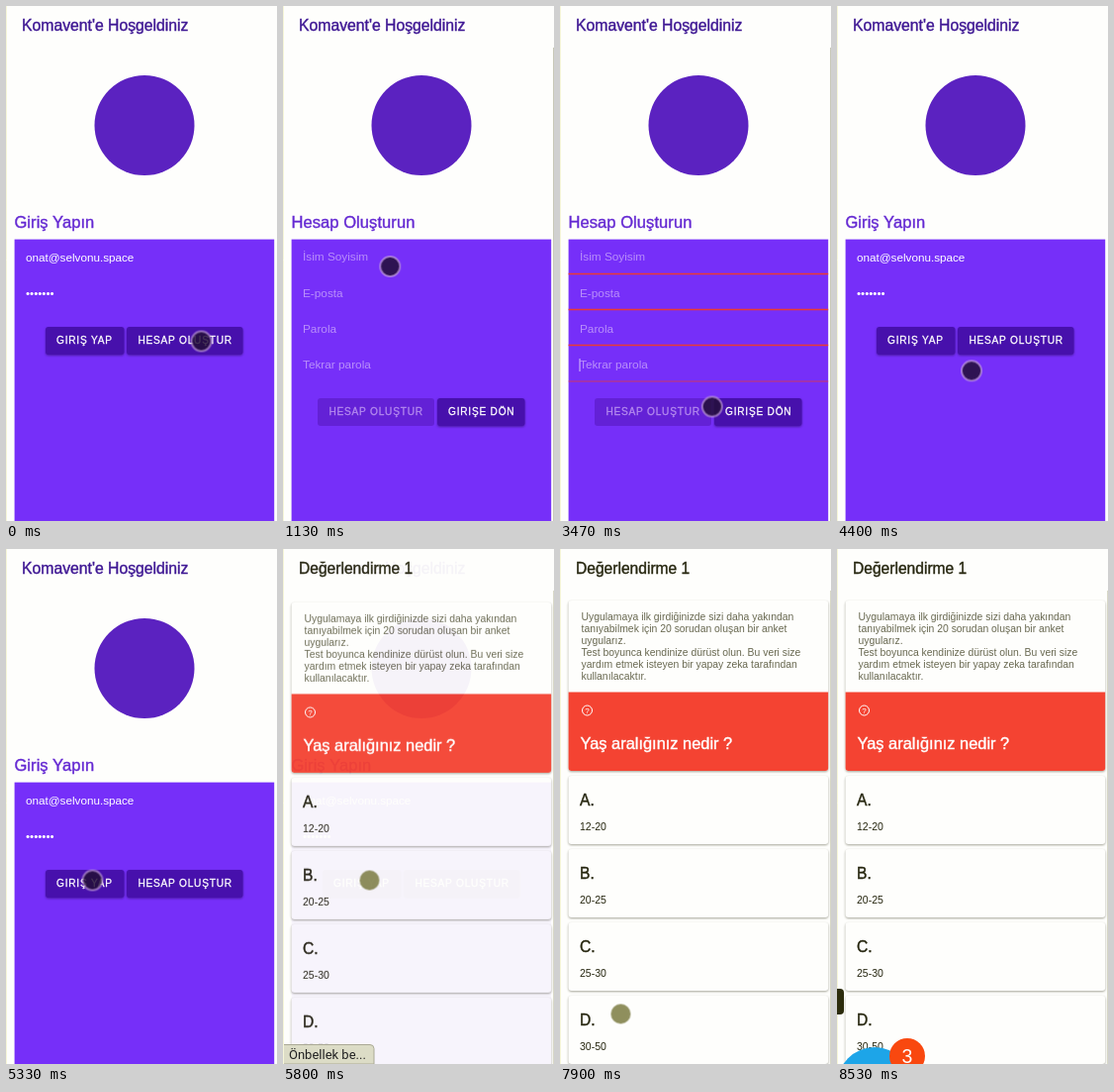
Recreate the animation shown at these times as an HTML page. Size 274 px wide and 520 px high, loop 8560 ms.

```html
<!DOCTYPE html>
<html lang="tr">
<head>
<meta charset="utf-8">
<title>Giriş ve değerlendirme</title>
<style>
html, body { margin: 0; width: 100%; height: 100%; overflow: hidden; background: #fefefc; }
svg { display: block; width: 274px; height: 520px; font-family: "Liberation Sans", Arial, sans-serif; }

/* Every animation shares one 8560 ms clock: 1% = 85.6 ms */
.login, .register, .assess, .body, .popup, .caret, .red, .status, .cursor, .touch, .dock {
  animation: 8560ms linear infinite;
}
.login, .register, .popup, .caret, .status, .touch { animation-timing-function: step-end; }

.medium { stroke: currentColor; stroke-width: .4px; }
.title { font-size: 15.75px; fill: #3f1894; color: #3f1894; }
.heading { font-size: 16.5px; letter-spacing: .08px; fill: #6428d2; color: #6428d2; }
.field { font-size: 11.7px; fill: #fff; }
.hint { font-size: 11.8px; fill: #b98ffa; }
.button rect { fill: #4710ac; filter: drop-shadow(0 1px 1px rgba(20, 0, 60, .45)); }
.button text { font-size: 10.1px; letter-spacing: .8px; fill: #fff; color: #fff; stroke-width: .3px; }
.off rect { fill: #6321d6; filter: none; }
.off text { fill: #b48aee; color: #b48aee; }
.card { fill: #fefefc; filter: drop-shadow(0 1px 1px rgba(30, 30, 0, .4)); }
.intro { font-size: 10.4px; fill: #686850; }
.letter { font-size: 15.6px; fill: #26260f; color: #26260f; }
.value { font-size: 10.5px; fill: #26260f; }
.native { font-family: Roboto, "Open Sans", sans-serif; font-size: 13.3px; fill: #222; }
.red { stroke: #ea3a34; stroke-width: 1.5px; }

.login { animation-name: login; }
@keyframes login { 0% { opacity: 1 } 8.18% { opacity: 0 } 45.2% { opacity: 1 } 70% { opacity: 0 } }
.register { animation-name: register; }
@keyframes register { 0% { opacity: 0 } 8.18% { opacity: 1 } 45.2% { opacity: 0 } }

.assess { animation-name: fade-in; }
@keyframes fade-in {
  0%, 66% { opacity: 0; animation-timing-function: cubic-bezier(.36, .66, .04, 1) }
  69.28%, 100% { opacity: 1 }
}
.body { animation-name: rise; }
@keyframes rise {
  0%, 66% { transform: translateY(40px); animation-timing-function: cubic-bezier(.36, .66, .04, 1) }
  69.28%, 100% { transform: none }
}

.popup { animation-name: popup; }
@keyframes popup { 0% { opacity: 0 } 16.8% { opacity: 1 } 26% { opacity: 0 } }
.status { animation-name: status; }
@keyframes status { 0% { opacity: 0 } 66% { opacity: 1 } 75.3% { opacity: 0 } }

.caret { animation-name: caret; }
@keyframes caret {
  0% { opacity: 0 }
  25.7% { opacity: 1; transform: translateY(36.5px) }
  29.4% { opacity: 1; transform: translateY(72.5px) }
  34.6% { opacity: 1; transform: translateY(109px) }
  43% { opacity: 0 }
}
.r1 { animation-name: red1; }
.r2 { animation-name: red2; }
.r3 { animation-name: red3; }
.r4 { animation-name: red4; }
@keyframes red1 { 0%, 15.2% { opacity: 0 } 17.5%, 100% { opacity: 1 } }
@keyframes red2 { 0%, 27.5% { opacity: 0 } 29.8%, 100% { opacity: 1 } }
@keyframes red3 { 0%, 33% { opacity: 0 } 35.3%, 100% { opacity: 1 } }
@keyframes red4 { 0%, 39.4% { opacity: 0 } 41.7%, 100% { opacity: 1 } }

.cursor { animation-name: cursor; animation-timing-function: ease-in-out; }
@keyframes cursor {
  0%, 8.18% { transform: translate(197.5px, 338.5px) }
  14.5% { transform: translate(100px, 256px) }
  18.1% { transform: translate(96px, 255px) }
  23.4%, 24.6% { transform: translate(95px, 282px) }
  25.7%, 27% { transform: translate(95px, 288px) }
  29.2%, 31.5% { transform: translate(92px, 325px) }
  34.5%, 37% { transform: translate(90px, 361px) }
  40.54% { transform: translate(153.5px, 404.5px); animation-timing-function: ease-out }
  43%, 46.1% { transform: translate(198px, 410px) }
  56% { transform: translate(88px, 336px) }
  62%, 75.4% { transform: translate(87.5px, 334.5px) }
  77.9% { transform: translate(94.5px, 324.5px) }
  85.5% { transform: translate(190px, 350px) }
  94% { transform: translate(50px, 480px) }
  96.2%, 100% { transform: translate(36px, 540px) }
}
.touch { animation-name: touch; }
@keyframes touch {
  0% { fill: rgba(34, 14, 54, .85); stroke: rgba(205, 170, 225, .6) }
  66.8% { fill: rgba(105, 105, 40, .75); stroke: transparent }
}

.dock { animation-name: dock; animation-timing-function: ease-out; }
@keyframes dock {
  0%, 96.2% { transform: translateY(50px); opacity: 0 }
  96.3% { transform: translateY(50px); opacity: 1 }
  99.4%, 100% { transform: none; opacity: 1 }
}
</style>
</head>
<body>
<svg viewBox="0 0 274 520">
  <rect width="274" height="520" fill="#fefefc"/>

  <!-- Shared welcome screen -->
  <text class="title medium" x="16" y="24.8">Komavent'e Hoşgeldiniz</text>
  <circle cx="140" cy="120.5" r="50.5" fill="#5b22c0"/>
  <rect x="8.6" y="235.6" width="262.6" height="285" fill="#762ff9"/>

  <g class="login">
    <text class="heading medium" x="8.4" y="224">Giriş Yapın</text>
    <text class="field" x="20" y="257.7">onat@selvonu.space</text>
    <text class="field" x="20" y="294">•••••••</text>
    <g class="button">
      <rect x="40" y="324" width="79.5" height="28" rx="3"/>
      <text class="medium" x="51" y="341.2">GIRIŞ YAP</text>
    </g>
    <g class="button">
      <rect x="122" y="324" width="117.5" height="28" rx="3"/>
      <text class="medium" x="133.4" y="341.2">HESAP OLUŞTUR</text>
    </g>
  </g>

  <g class="register">
    <text class="heading medium" x="8.4" y="224">Hesap Oluşturun</text>
    <path d="M273.5 42V520" stroke="#c9c9b8"/>
    <g class="hint">
      <text x="20" y="257">İsim Soyisim</text>
      <text x="20" y="293.5">E-posta</text>
      <text x="20" y="329.5">Parola</text>
      <text x="20" y="365.7">Tekrar parola</text>
    </g>
    <path class="red r1" d="M8.6 270.5H271.2"/>
    <path class="red r2" d="M8.6 306.5H271.2"/>
    <path class="red r3" d="M8.6 342.5H271.2"/>
    <path class="red r4" d="M8.6 379H271.2"/>
    <rect class="caret" x="19.5" y="247" width="1" height="13" fill="#d9c4fa"/>
    <g class="button off">
      <rect x="35" y="396" width="118" height="28" rx="3"/>
      <text class="medium" x="46.4" y="413.2">HESAP OLUŞTUR</text>
    </g>
    <g class="button">
      <rect x="156" y="396" width="88.5" height="28" rx="3"/>
      <text class="medium" x="167" y="413.2">GIRIŞE DÖN</text>
    </g>
    <g class="popup">
      <rect class="card" x="27" y="363" width="260" height="93" rx="4"/>
      <path d="M27 415.5H274" stroke="#c8c8bc"/>
      <g class="native">
        <text x="39.5" y="394" font-weight="500">Onat Selvonu</text>
        <text x="39.5" y="441">Yönet...</text>
      </g>
    </g>
  </g>

  <g class="assess">
    <rect width="274" height="520" fill="#fefefc"/>
    <path d="M273.5 42V520" stroke="#d9d9c8"/>
    <text class="letter medium" x="16" y="25">Değerlendirme 1</text>
    <g class="body">
      <rect class="card" x="8.6" y="52" width="262.6" height="172" rx="3"/>
      <g class="intro">
        <text x="21.5" y="72">Uygulamaya ilk girdiğinizde sizi daha yakından</text>
        <text x="21.5" y="84">tanıyabilmek için 20 sorudan oluşan bir anket</text>
        <text x="21.5" y="96">uygularız.</text>
        <text x="21.5" y="108">Test boyunca kendinize dürüst olun. Bu veri size</text>
        <text x="21.5" y="120">yardım etmek isteyen bir yapay zeka tarafından</text>
        <text x="21.5" y="132">kullanılacaktır.</text>
      </g>
      <path d="M8.6 144.5H271.2V221a3 3 0 0 1-3 3H11.6a3 3 0 0 1-3-3z" fill="#f44332"/>
      <circle cx="27.5" cy="163" r="5" fill="none" stroke="#fff"/>
      <text x="27.5" y="166" font-size="8" fill="#fff" text-anchor="middle">?</text>
      <text class="medium" x="20.5" y="201.5" font-size="16.4" fill="#fff" color="#fff">Yaş aralığınız nedir ?</text>
      <g id="options"></g>
    </g>
  </g>

  <g class="status">
    <path d="M0 500.5H88a4 4 0 0 1 4 4V520H0z" fill="#dcdcc6" stroke="#aaa994"/>
    <text class="native" x="6" y="514.5" style="font-size:13px">Önbellek be...</text>
  </g>

  <path d="M.5 0V520" stroke="#f6f6d8"/>

  <g class="cursor"><circle class="touch" r="10" stroke-width="2"/></g>

  <g class="dock">
    <rect x="-12" y="444" width="19" height="26" rx="4" fill="#2c2c0c"/>
    <circle cx="38" cy="541" r="38" fill="#1da5e8"/>
    <circle cx="71" cy="512" r="18" fill="#f9480f"/>
    <text x="71" y="519" font-size="19.5" fill="#fff" text-anchor="middle">3</text>
  </g>
</svg>
<script>
const ranges = ["12-20", "20-25", "25-30", "30-50"];
document.getElementById("options").innerHTML = ranges.map((range, i) => `
  <g transform="translate(0 ${i * 74})">
    <rect class="card" x="8.6" y="229" width="262.6" height="69" rx="3"/>
    <text class="letter medium" x="20" y="258.5">${"ABCD"[i]}.</text>
    <text class="value" x="20" y="284">${range}</text>
  </g>`).join("");
</script>
</body>
</html>
```
